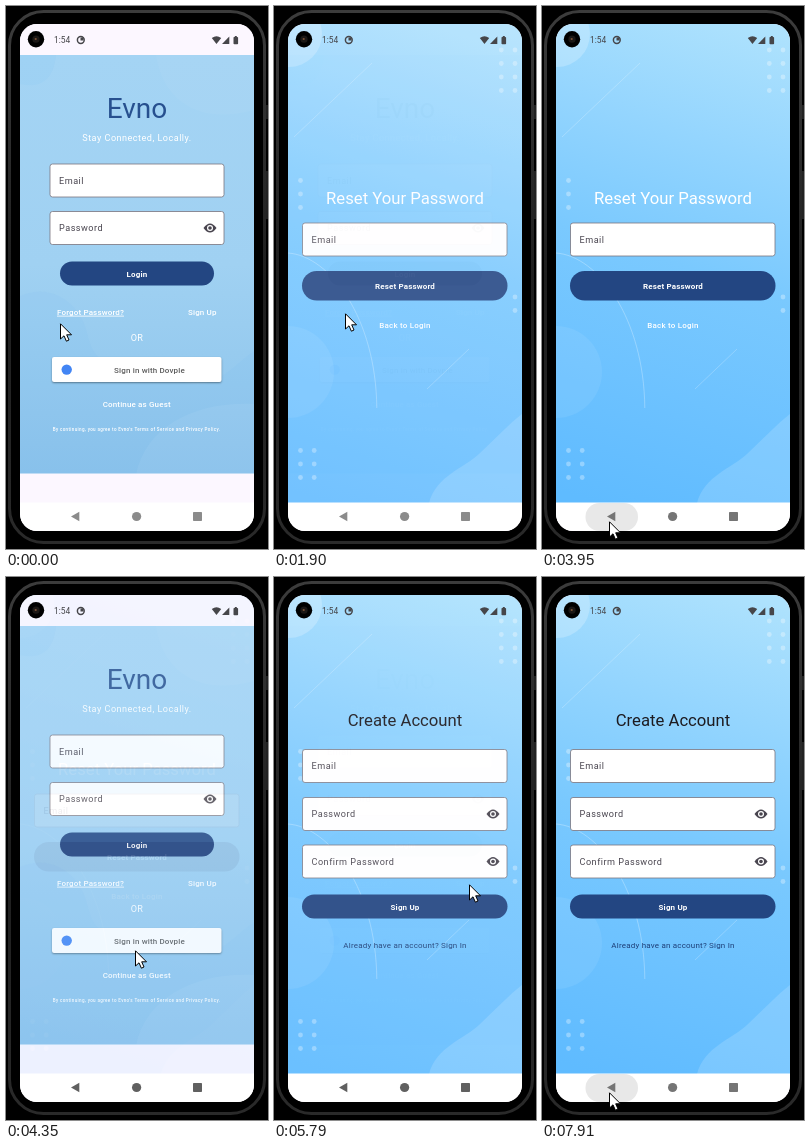
Recreate the animation shown at these times as an HTML page with a canvas. Size 262 by 543 pixels, loop 8 s.

```html
<!DOCTYPE html>
<html lang="en">
<head>
<meta charset="utf-8">
<title>Login flow</title>
<style>
html, body { margin: 0; width: 100%; height: 100%; overflow: hidden; background: #000; }
canvas { display: block; width: 262px; height: 543px; }
</style>
</head>
<body>
<canvas id="stage"></canvas>
<script>
const W = 262, H = 543, LOOP = 8000;
const NAVY = '#234682', LABEL = '#49454f', SURFACE = '#fcf7ff';
const dpr = window.devicePixelRatio || 1;
const stage = document.getElementById('stage');

function makeLayer(canvas = document.createElement('canvas')) {
  canvas.width = Math.round(W * dpr);
  canvas.height = Math.round(H * dpr);
  const g = canvas.getContext('2d');
  g.scale(dpr, dpr);
  return g;
}

// Each entry: [start time, value...]; values hold until the next entry.
const cursorSteps = [
  [0, 54, 317], [120, 60, 311], [240, 65, 307], [540, 70, 307], [660, 71, 307],
  [2050, 74, 360], [2170, 78, 470], [2300, 76, 523], [2450, 70, 518], [2570, 67, 515],
  [4230, 92, 450], [4350, 129, 373], [4490, 155, 347], [4610, 172, 333],
  [4760, 188, 320], [4890, 196, 311], [5040, 199, 304], [5170, 197, 306], [5290, 195, 307],
  [6060, 144, 404], [6220, 105, 484], [6370, 91, 500], [6520, 88, 500], [6660, 80, 501],
  [7050, 72, 510], [7180, 67, 515]
];
// [time, old page, new page, old opacity, new opacity]
const pageSteps = [
  [0, 'login', 'login', 0, 1],
  [1750, 'login', 'reset', 0.6, 0.4], [1900, 'login', 'reset', 0.2, 0.87],
  [2050, 'login', 'reset', 0, 0.97], [2170, 'reset', 'reset', 0, 1],
  [4230, 'reset', 'login', 0.7, 0.4], [4350, 'reset', 'login', 0.55, 0.83],
  [4490, 'reset', 'login', 0, 0.97], [4610, 'login', 'login', 0, 1],
  [5550, 'login', 'signup', 0.6, 0.45], [5670, 'login', 'signup', 0.35, 0.78],
  [5790, 'login', 'signup', 0.15, 0.92], [5910, 'signup', 'signup', 0, 1]
];
const navSteps = [
  [0, '#8b8b8b', 0], [3950, '#757575', 1], [4090, '#606060', 1], [4230, '#606060', 0],
  [7050, '#8b8b8b', 0], [7910, '#757575', 1]
];

function stepAt(steps, t) {
  let current = steps[0];
  for (const s of steps) if (s[0] <= t) current = s;
  return current.slice(1);
}

function box(g, x, y, w, h, r, fill, stroke, line = 1) {
  g.beginPath();
  g.roundRect(x, y, w, h, r);
  if (fill) { g.fillStyle = fill; g.fill(); }
  if (stroke) { g.strokeStyle = stroke; g.lineWidth = line; g.stroke(); }
}

function disc(g, x, y, r, fill) {
  g.fillStyle = fill;
  g.beginPath();
  g.arc(x, y, r, 0, Math.PI * 2);
  g.fill();
}

function path(g, d, fill, stroke, line = 1) {
  const p = new Path2D(d);
  if (fill) { g.fillStyle = fill; g.fill(p); }
  if (stroke) { g.strokeStyle = stroke; g.lineWidth = line; g.stroke(p); }
}

function text(g, str, x, y, size, color, { weight = 400, gap = 0, align = 'center' } = {}) {
  g.font = `${weight} ${size}px Roboto, sans-serif`;
  g.letterSpacing = gap + 'px';
  g.textAlign = align;
  g.fillStyle = color;
  g.fillText(str, x, y);
}

function eye(g, x, y) {
  path(g, `M${x - 6.5} ${y}Q${x} ${y - 9} ${x + 6.5} ${y}Q${x} ${y + 9} ${x - 6.5} ${y}Z`, LABEL);
  disc(g, x, y, 3, '#fff');
  disc(g, x, y, 1.8, LABEL);
}

function field(g, x, y, w, label, secret) {
  box(g, x + 0.5, y + 0.5, w - 1, 33, 2.5, '#fff', '#79747e', 0.8);
  text(g, label, x + 9.5, y + 20, 9.1, LABEL, { gap: 0.5, align: 'left' });
  if (secret) eye(g, x + w - 14.5, y + 17);
}

function button(g, x, y, w, h, label) {
  box(g, x, y, w, h, h / 2, NAVY);
  text(g, label, 131, y + h / 2 + 3, 8, '#fff', { weight: 600, gap: 0.15 });
}

function gradient(g, x0, y0, x1, y1, ...colors) {
  const grad = g.createLinearGradient(x0, y0, x1, y1);
  colors.forEach((c, i) => grad.addColorStop(i / (colors.length - 1), c));
  return grad;
}

function drawLogin(g) {
  g.fillStyle = SURFACE;
  g.fillRect(14, 18, 234, 479);
  g.save();
  g.beginPath();
  g.rect(14, 49, 234, 418.5);
  g.clip();
  g.fillStyle = gradient(g, 0, 49, 0, 467, '#a4d4f4', '#a0d1f2', '#8bc3eb');
  g.fillRect(14, 49, 234, 419);
  path(g, 'M150 49C156 92 190 120 248 104V49Z', 'rgba(255,255,255,.03)');
  path(g, 'M14 78C40 84 48 68 50 49H14Z', 'rgba(90,165,225,.06)');
  path(g, 'M14 290C48 275 76 300 82 330C92 375 130 350 170 372C205 392 225 360 248 345V468H14Z', 'rgba(80,160,220,.05)');
  path(g, 'M130 468C140 420 190 395 248 398V468Z', 'rgba(255,255,255,.05)');
  g.restore();

  text(g, 'Evno', 131, 112, 28, '#27508f');
  text(g, 'Stay Connected, Locally.', 131, 135, 9.1, '#fff', { gap: 0.48 });
  field(g, 43.5, 157.5, 175, 'Email');
  field(g, 43.5, 205, 175, 'Password', true);
  button(g, 54, 255.5, 154, 24, 'Login');
  const link = { weight: 500, gap: 0.15 };
  text(g, 'Forgot Password?', 51, 308.5, 8, '#fff', { ...link, align: 'left' });
  g.fillRect(51, 309.7, 67, 0.8);
  text(g, 'Sign Up', 182, 308.5, 8, '#fff', { ...link, align: 'left' });
  text(g, 'OR', 131, 335, 9.1, '#fff', { gap: 0.28 });

  g.save();
  g.shadowColor = 'rgba(0,0,0,.4)';
  g.shadowBlur = 2 * dpr;
  g.shadowOffsetY = dpr;
  box(g, 46, 351, 169.5, 25, 2, '#fff');
  g.restore();
  disc(g, 60.7, 363.6, 5.2, '#4285f4');
  text(g, 'Sign in with Dovple', 143.5, 366.5, 8, '#5c5c5c', link);
  text(g, 'Continue as Guest', 130.7, 400.5, 8, '#fff', link);
  text(g, "By continuing, you agree to Evno's Terms of Service and Privacy Policy.",
    130.5, 425.3, 4.55, '#fff', { weight: 500, gap: 0.34 });
}

function dots(g, x, y, cols, rows) {
  for (let c = 0; c < cols; c++)
    for (let r = 0; r < rows; r++)
      disc(g, x + c * 13.7, y + r * 13.5, 2.4, 'rgba(255,255,255,.32)');
}

function drawBackdrop(g) {
  g.fillStyle = gradient(g, 215, 18, 55, 497, '#aee2fd', '#94d5fe', '#7ac9fe', '#6dc2ff', '#5fbbff');
  g.fillRect(14, 18, 234, 479);
  g.save();
  g.beginPath();
  g.rect(14, 18, 234, 479);
  g.clip();
  disc(g, 15, 28, 33, 'rgba(255,255,255,.22)');
  disc(g, 14, 366, 46, 'rgba(255,255,255,.07)');
  path(g, 'M155 497C162 470 190 462 205 448C222 432 236 417 248 408V497Z', 'rgba(255,255,255,.15)');
  path(g, 'M20 131L98 57M153 383L195 343', null, 'rgba(255,255,255,.28)', 0.8);
  path(g, 'M14 247C56 250 102 312 102.8 402', null, 'rgba(255,255,255,.35)', 0.8);
  dots(g, 227.3, 44, 2, 4);
  dots(g, 26.5, 174.5, 1, 3);
  dots(g, 241, 291, 1, 2);
  dots(g, 26.5, 444.5, 2, 3);
  g.restore();
}

function drawReset(g) {
  drawBackdrop(g);
  text(g, 'Reset Your Password', 131, 197.5, 16.7, '#fff');
  field(g, 28, 216.5, 205.5, 'Email');
  button(g, 28, 265, 205.5, 29.5, 'Reset Password');
  text(g, 'Back to Login', 131, 321.5, 8, '#fff', { weight: 500, gap: 0.2 });
}

function drawSignup(g) {
  drawBackdrop(g);
  text(g, 'Create Account', 131, 148.5, 16.7, '#1d1b20');
  field(g, 28, 172, 205.5, 'Email');
  field(g, 28, 220, 205.5, 'Password', true);
  field(g, 28, 267.5, 205.5, 'Confirm Password', true);
  button(g, 28, 317.5, 205.5, 24, 'Sign Up');
  text(g, 'Already have an account? Sign In', 131, 371, 8, '#1d3f78', { gap: 0.2 });
}

function drawPhone(g) {
  g.fillStyle = '#000';
  g.fillRect(0, 0, W, H);
  g.fillStyle = '#222';
  g.fillRect(260, 99, 2, 14);
  g.fillRect(260, 165, 2, 48);
  box(g, 3.5, 5.5, 255, 531, 34, '#000', gradient(g, 0, 5, 0, 537, '#3c3c3c', '#1e1e1e', '#2a2a2a'), 3);
}

function drawStatus(g) {
  disc(g, 30, 33.2, 8.2, '#000');
  disc(g, 30, 33.2, 3.6, '#1b1715');
  disc(g, 29.7, 33, 1.1, '#7a5136');
  const ink = '#46464a';
  text(g, '1:54', 48, 37.3, 8.4, ink, { align: 'left' });
  g.strokeStyle = ink;
  g.lineWidth = 1.5;
  g.beginPath();
  g.arc(74.8, 34, 3.4, 0, Math.PI * 2);
  g.stroke();
  g.fillStyle = ink;
  g.fillRect(74.5, 31.5, 3, 3);
  path(g, 'M205.8 32Q210.5 28.6 215.2 32L210.5 38Z', ink);
  path(g, 'M216 38L223.3 30.5V38Z', ink);
  box(g, 227.5, 31, 4.6, 7.2, 0.8, ink);
  g.fillRect(228.8, 30, 2, 1.5);
}

function drawNav(g, ink, ripple) {
  g.fillStyle = '#fff';
  g.fillRect(14, 496.5, 234, 29);
  if (ripple) box(g, 43.5, 497, 52.5, 28, 14, '#e8e8e8');
  path(g, 'M65 510.5L73.3 505.7V515.3Z', ink);
  disc(g, 130.6, 510.5, 4.6, ink);
  box(g, 187, 506, 9, 9, 0.8, ink);
}

function drawCursor(g, x, y) {
  g.save();
  g.translate(x, y);
  path(g, 'M.5 .8V16L4 12.8L6.4 18.2L9 17L6.7 11.8H11.5Z', '#fff', '#000', 1);
  g.restore();
}

const pages = {};
for (const [name, draw] of Object.entries({ login: drawLogin, reset: drawReset, signup: drawSignup })) {
  const layer = makeLayer();
  draw(layer);
  pages[name] = layer.canvas;
}
const ctx = makeLayer(stage);

function drawPage(name, alpha) {
  ctx.globalAlpha = alpha;
  ctx.drawImage(pages[name], 0, 0, W, H);
  ctx.globalAlpha = 1;
}

function render(t) {
  const [from, to, fromAlpha, toAlpha] = stepAt(pageSteps, t);
  const [navInk, ripple] = stepAt(navSteps, t);
  drawPhone(ctx);
  ctx.save();
  ctx.beginPath();
  ctx.roundRect(14, 18, 234, 507, 17);
  ctx.clip();
  // Both pages fade over the plain app surface.
  ctx.fillStyle = SURFACE;
  ctx.fillRect(14, 18, 234, 507);
  drawPage(from, fromAlpha);
  drawPage(to, toAlpha);
  if (t >= 1470 && t < 1750) box(ctx, 51, 294, 75, 23, 11.5, 'rgba(255,255,255,.1)');
  if (t >= 5290 && t < 5550) box(ctx, 182, 302, 29, 9, 4, 'rgba(255,255,255,.08)');
  drawNav(ctx, navInk, ripple);
  drawStatus(ctx);
  ctx.restore();
  drawCursor(ctx, ...stepAt(cursorSteps, t));
}

function tick() {
  render(performance.now() % LOOP);
  requestAnimationFrame(tick);
}
tick();
</script>
</body>
</html>
```
